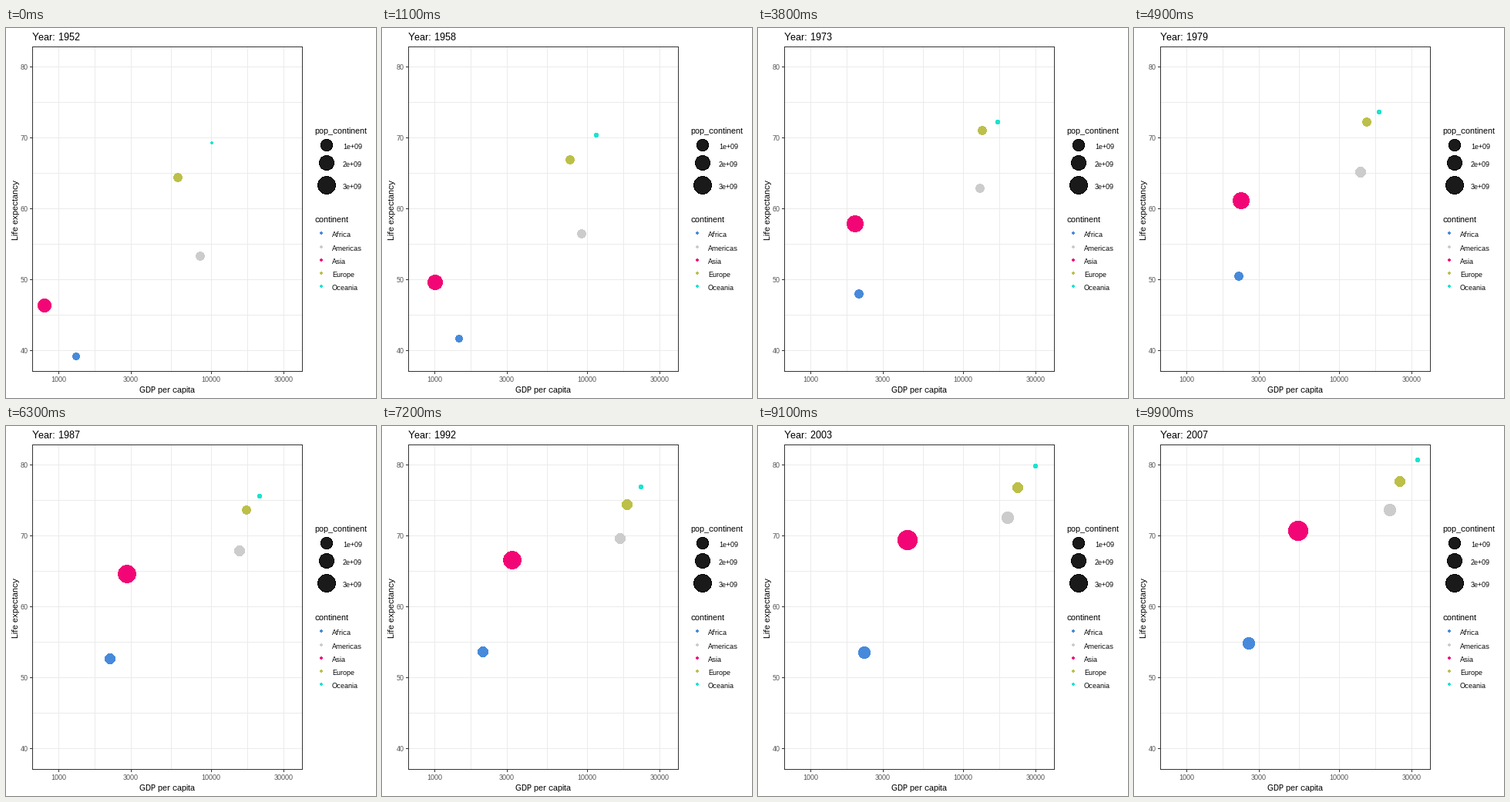
Recreate the animation shown at these times as a matplotlib script. Size 480 by 480 pixels, loop 10000 ms.

```python
import numpy as np
import matplotlib.pyplot as plt
from matplotlib.animation import FuncAnimation
from matplotlib.patches import Polygon, Rectangle

plt.rcParams.update({
    "font.family": "Liberation Sans",
    "text.hinting": "native",
    "text.hinting_factor": 1,
})

SIZE, FRAMES, INTERVAL = 480, 100, 100
LEFT, RIGHT, TOP, BOTTOM = 34, 384, 24, 445
GRID, DARK, LABEL = "#ebebeb", "#333333", "#4d4d4d"
START, END = 1952, 2007

# Waypoints once a decade plus the last year; population in millions at three
KEY_YEARS = [*range(START, END, 10), END]
POP_YEARS = [START, 1980, END]
CONTINENTS = {
    "Africa": dict(color="#478adb", pop=[238, 476, 930],
                   gdp=[1311, 1541, 2063, 2276, 2085, 2206, 2561],
                   life=[39.1, 43.3, 47.5, 51.6, 53.6, 53.3, 54.8]),
    "Americas": dict(color="#cccccc", pop=[345, 609, 899],
                     gdp=[8528, 9760, 12700, 14480, 16616, 19563, 21603],
                     life=[53.3, 58.4, 62.4, 66.2, 69.6, 72.4, 73.6]),
    "Asia": dict(color="#f20675", pop=[1395, 2756, 3812],
                 gdp=[806, 1169, 1908, 2426, 3234, 4196, 5432],
                 life=[46.3, 51.6, 57.3, 62.6, 66.5, 69.2, 70.7]),
    "Europe": dict(color="#bcc048", pop=[418, 526, 586],
                   gdp=[6097, 9010, 13100, 16040, 18417, 22642, 25244],
                   life=[64.4, 68.5, 70.8, 72.8, 74.4, 76.7, 77.6]),
    "Oceania": dict(color="#1ce3cd", pop=[10.7, 17.9, 24.5],
                    gdp=[10136, 12397, 16654, 19155, 22593, 29438, 32885],
                    life=[69.3, 71.1, 71.9, 74.3, 76.9, 79.7, 80.7]),
}
POP_MIN, POP_MAX = 10.7, 3812


def px(gdp):
    return 68.2 + 197.6 * (np.log10(gdp) - 3)


def py(life):
    return BOTTOM - 9.19 * (np.asarray(life) - 37.056)


def dot_radius(size):
    return int(0.375 * (size * 2.845 + 0.945) + 0.5)


def pop_radius(pop):
    return dot_radius(2 + 10 * np.sqrt((pop - POP_MIN) / (POP_MAX - POP_MIN)))


def disc(x, y, r):
    """Outline of a disc stepped along whole pixels."""
    right, left = [], []
    for row in range(-r, r):
        half = round(np.sqrt(r * r - (row + 0.5) ** 2))
        for edge in (row, row + 1):
            right.append((x + half, y + edge))
            left.append((x - half, y + edge))
    return right + left[::-1]


fig = plt.figure(figsize=(SIZE / 72, SIZE / 72), dpi=72, facecolor="white")
ax = fig.add_axes([0, 0, 1, 1])
ax.set_xlim(0, SIZE)
ax.set_ylim(SIZE, 0)
ax.axis("off")


def bar(x, y, w, h, color, z):
    ax.add_patch(Rectangle((x, y), w, h, color=color, lw=0, zorder=z, antialiased=False))


def hline(x0, x1, y, color, z=1):
    bar(x0, y, x1 - x0 + 1, 1, color, z)


def vline(x, y0, y1, color, z=1):
    bar(x, y0, 1, y1 - y0 + 1, color, z)


def dot(x, y, r, color):
    return ax.add_patch(Polygon(disc(x, y, r), facecolor=color, lw=0,
                                zorder=2, antialiased=False))


def text(x, y, s, size, color="black", **kw):
    return ax.text(x, y, s, fontsize=size, color=color, va="baseline", **kw)


# Grid, ticks and tick labels
x_ticks = {g: round(px(g)) for g in (1000, 3000, 10000, 30000)}
for x in [*x_ticks.values(), 115, 214, 313]:
    vline(x, TOP, BOTTOM, GRID)
for life in range(40, 81, 5):
    hline(LEFT, RIGHT, round(py(life)), GRID)
for g, x in x_ticks.items():
    vline(x, BOTTOM, BOTTOM + 3, DARK, 3)
    text(x, 459, str(g), 9.3, LABEL, ha="center")
for life in range(40, 81, 10):
    y = round(py(life))
    hline(LEFT - 3, LEFT, y, DARK, 3)
    text(29, y + 4, str(life), 9.3, LABEL, ha="right")

# Panel border
for y in (TOP, BOTTOM):
    hline(LEFT, RIGHT, y, DARK, 3)
for x in (LEFT, RIGHT):
    vline(x, TOP, BOTTOM, DARK, 3)

title = text(34, 16, "", 13)
text(209, 473, "GDP per capita", 11, ha="center")
text(16, 275, "Life expectancy", 11, rotation=90, rotation_mode="anchor")

# Legends
text(400, 137, "pop_continent", 11)
for n, y in zip((1, 2, 3), (152, 175, 204)):
    r = pop_radius(1000 * n)
    dot(416, y, r, "black")
    dot(416, y, r - 1, "#1a1a1a")
    text(437, y + 5, f"{n}e+09", 9.3)
text(400, 252, "continent", 11)
for i, (name, c) in enumerate(CONTINENTS.items()):
    y = round(266.3 + 17.28 * i)
    dot(409, y, dot_radius(1.5), c["color"])
    text(423, y + 5, name, 9.3)

dots = {name: dot(0, 0, 1, c["color"]) for name, c in CONTINENTS.items()}


def update(i):
    year = START + (END - START) * i / (FRAMES - 1)
    title.set_text(f"Year: {round(year)}")
    for name, c in CONTINENTS.items():
        x = np.interp(year, KEY_YEARS, px(c["gdp"]))
        y = np.interp(year, KEY_YEARS, py(c["life"]))
        r = pop_radius(np.interp(year, POP_YEARS, c["pop"]))
        dots[name].set_xy(disc(round(x), round(y), r))
    return [title, *dots.values()]


anim = FuncAnimation(fig, update, frames=FRAMES, interval=INTERVAL,
                     repeat=True, repeat_delay=0, blit=False)
plt.show()
```
